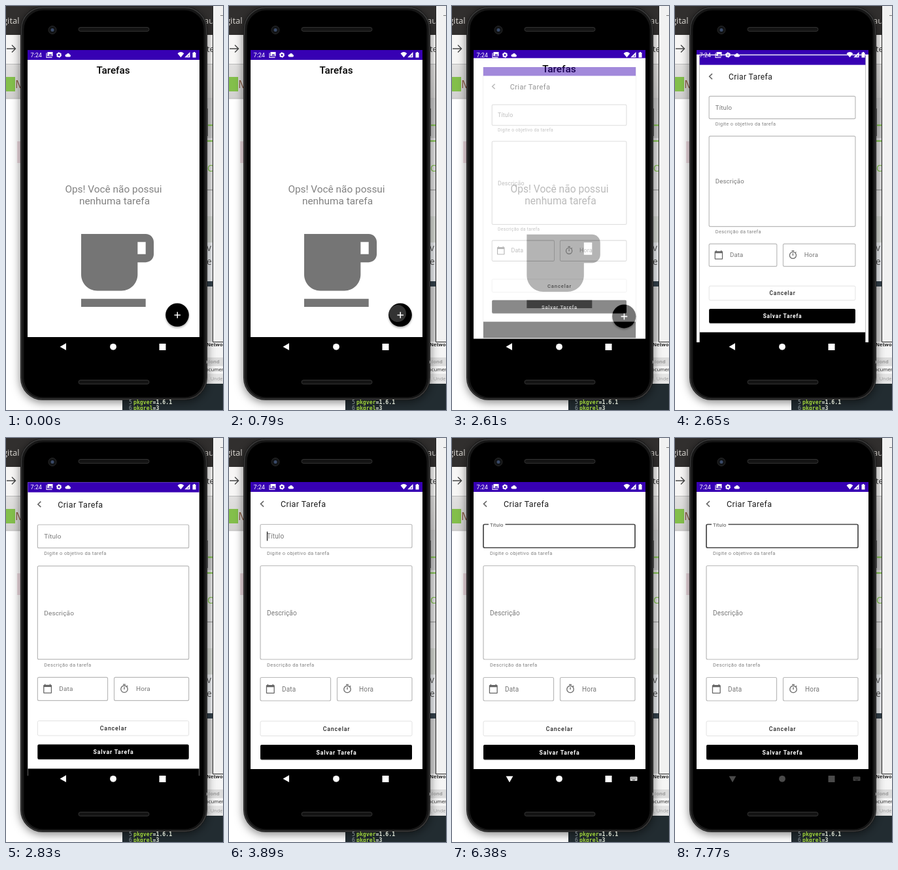
These frames come from a looping animation (332x615 px, 8000 ms). An HTML page:

```html
<!DOCTYPE html>
<html lang="pt">
<head>
<meta charset="utf-8">
<style>
  html, body { margin: 0; width: 100%; height: 100%; overflow: hidden; background: #fff; }
  svg { display: block; width: 332px; height: 615px; }
  text { font-family: Roboto, sans-serif; }
  .desk text { font-family: "Open Sans", sans-serif; }
  .desk .mono { font: bold 8.2px "DejaVu Sans Mono", monospace; }
  .desk .line { font-weight: 400; fill: #8a9499; }
  .input { font-size: 10px; letter-spacing: .15px; fill: #777; }
  .hint { font-size: 7.6px; letter-spacing: .35px; fill: #808080; }
  .button { font-size: 8.75px; font-weight: 500; letter-spacing: .88px; text-anchor: middle; }
  .box { fill: none; stroke: #b9b9b9; stroke-width: 1.2; }
</style>
</head>
<body>
<svg viewBox="0 0 332 615">
  <defs>
    <clipPath id="screenClip"><rect x="33" y="67" width="263" height="465"/></clipPath>
    <clipPath id="fabClip"><circle cx="262" cy="470.3" r="17.8"/></clipPath>
    <filter id="phoneShadow" x="-20%" y="-10%" width="140%" height="120%">
      <feDropShadow dx="0" dy="3" stdDeviation="7" flood-opacity=".5"/>
    </filter>
    <filter id="fabShadow" x="-30%" y="-30%" width="160%" height="180%">
      <feDropShadow dx="0" dy="1.8" stdDeviation="1.8" flood-opacity=".35"/>
    </filter>
    <filter id="buttonShadow" x="-5%" y="-30%" width="110%" height="180%">
      <feDropShadow dx="0" dy=".7" stdDeviation=".7" flood-opacity=".35"/>
    </filter>
    <linearGradient id="tabs" x2="0" y2="1">
      <stop stop-color="#e2e1e0"/><stop offset="1" stop-color="#d2d1d0"/>
    </linearGradient>
  </defs>

  <!-- desktop behind the phone -->
  <g class="desk">
    <rect width="332" height="615" fill="#fff"/>
    <rect width="332" height="44" fill="#312f2e"/>
    <text x="-5" y="27" font-size="13" fill="#dedbd6">gital</text>
    <text x="303" y="27" font-size="13" fill="#dedbd6">au</text>
    <rect y="44" width="332" height="44" fill="#f7f6f5"/>
    <path d="M1 65H14M9 59.5L14.5 65L9 70.5" fill="none" stroke="#444" stroke-width="1.4"/>
    <text x="307" y="70" font-size="13" fill="#333">te</text>
    <rect y="88" width="332" height="53" fill="url(#tabs)"/>
    <path d="M0 88.5H332M0 141H332" stroke="#bbb"/>
    <rect x="-8" y="108" width="22" height="22" fill="#83bf4b"/>
    <text x="14" y="125" font-size="17" fill="#86583f">M</text>
    <rect x="17" y="206" width="6" height="33" fill="#efdce2"/>
    <rect x="300" y="141" width="32" height="60" fill="#c9c9c9"/>
    <rect x="300" y="201" width="32" height="159" fill="#e4e4e4"/>
    <path d="M306 181.5H316M306 205.5H316" stroke="#7bc143" stroke-width="2"/>
    <text x="308" y="252" font-size="14" fill="#7bc143">C</text>
    <path d="M308 280H316" stroke="#888"/>
    <rect x="300" y="320" width="32" height="40" fill="#d4d8d2"/>
    <rect x="300" y="360" width="32" height="60" fill="#eceef1"/>
    <text x="307" y="373" font-size="14" fill="#555">v</text>
    <text x="307" y="394" font-size="14" fill="#555">e</text>
    <rect x="300" y="419" width="32" height="8" fill="#33404a"/>
    <rect x="300" y="427" width="32" height="84" fill="#d5d5d5"/>
    <rect x="300" y="511" width="32" height="24" fill="#f5f5f5"/>
    <rect x="300" y="535" width="32" height="13" fill="#dcdcdc"/>
    <rect x="300" y="548" width="32" height="12" fill="#f5f5f5"/>
    <rect x="300" y="560" width="32" height="15" fill="#e4e4e4"/>
    <rect x="178" y="575" width="154" height="40" fill="#222c31"/>
  </g>

  <!-- phone body -->
  <rect x="22" y="1" width="286" height="599" rx="34" fill="#161616" filter="url(#phoneShadow)"/>
  <rect x="23.5" y="2.5" width="283" height="596" rx="32.5" fill="none" stroke="#3c3c3c" stroke-width="1.4"/>
  <rect x="27.5" y="6.5" width="275" height="589" rx="29"/>
  <g fill="#141414" stroke="#333">
    <rect x="111" y="32.5" width="108" height="6" rx="3"/>
    <rect x="111" y="569.5" width="108" height="6" rx="3"/>
  </g>
  <circle cx="71" cy="36.5" r="6" fill="#111315" stroke="#292929"/>
  <circle cx="71" cy="36.5" r="2.5" fill="#3a4a68"/>
  <path d="M308.5 156V198" stroke="#555"/>

  <g class="desk">
    <g font-weight="700" font-size="7.4">
      <text x="307" y="518" fill="#222">Networ</text>
      <text x="306" y="544" fill="#999">xiond</text>
    </g>
    <text x="305" y="556" font-size="7.8" fill="#222">ocumer</text>
    <text x="309" y="570" font-size="7.4" fill="#999">, Unde</text>
    <text class="mono line" x="188" y="606">5</text>
    <text class="mono" x="195" y="606" fill="#9fd23c">pkgver<tspan fill="#dfe6d8">=1.6.1</tspan></text>
    <text class="mono line" x="188" y="615">6</text>
    <text class="mono" x="195" y="615" fill="#9fd23c">pkgrel<tspan fill="#dfe6d8">=3</tspan></text>
    <path d="M316.5 -1V511.5H333V-1Z" fill="#f1f1f1" stroke="#222"/>
    <path d="M328 14.5H332" stroke="#777"/>
  </g>

  <g clip-path="url(#screenClip)">
    <rect x="33" y="67" width="263" height="465"/>
    <g id="home">
      <rect x="33" y="67" width="263" height="465"/>
      <rect x="33" y="67" width="263" height="437" fill="#fff"/>
      <rect x="33" y="67" width="263" height="15" fill="#3700b3"/>
      <text x="164" y="103" font-size="15.2" font-weight="500" text-anchor="middle">Tarefas</text>
      <g font-size="15.4" fill="#828282" text-anchor="middle">
        <text x="164.5" y="284">Ops! Você não possui</text>
        <text x="166" y="302">nenhuma tarefa</text>
      </g>
      <path transform="translate(90.3 328.5) scale(6.17)" fill="#757575" d="M20 3H4v10c0 2.21 1.79 4 4 4h6c2.21 0 4-1.79 4-4v-3h2c1.11 0 2-.89 2-2V5c0-1.11-.89-2-2-2zm0 5h-2V5h2v3zM4 19h16v2H4z"/>
      <circle cx="262" cy="470.3" r="17.8" filter="url(#fabShadow)"/>
      <g clip-path="url(#fabClip)"><circle id="ripple" cx="258" cy="468" fill="#fff"/></g>
      <path d="M257.5 470.5H267M262.25 465.75V475.25" stroke="#fff" stroke-width="1.5"/>
    </g>

    <g id="form">
      <rect x="33" y="67" width="263" height="465"/>
      <rect x="33" y="67" width="263" height="437" fill="#fff"/>
      <rect x="33" y="67" width="263" height="15" fill="#3700b3"/>
      <path d="M53 96L48.5 100.3L53 104.6" fill="none" stroke="#666" stroke-width="1.6"/>
      <text x="79" y="105" font-size="12.5" letter-spacing=".4" fill="#1c1c1c">Criar Tarefa</text>

      <rect id="titleBox" class="box" x="48" y="131.5" width="232" height="35.5" rx="2"/>
      <rect id="notch" x="56" y="129" height="5" fill="#fff"/>
      <text id="titleLabel" class="input">Título</text>
      <path id="caret" d="M58.5 142.5V156.5" stroke="#111" stroke-width="1.2"/>
      <text class="hint" x="58" y="178">Digite o objetivo da tarefa</text>

      <rect class="box" x="48" y="194.5" width="232" height="142.5" rx="2"/>
      <text class="input" x="58" y="269.5">Descrição</text>
      <text class="hint" x="58" y="348">Descrição da tarefa</text>

      <rect class="box" x="48" y="364.5" width="107.5" height="35.5" rx="2"/>
      <rect class="box" x="165.5" y="364.5" width="114.5" height="35.5" rx="2"/>
      <path transform="translate(55.5 374) scale(.65)" fill="#666" d="M20 3h-1V1h-2v2H7V1H5v2H4c-1.1 0-2 .9-2 2v16c0 1.1.9 2 2 2h16c1.1 0 2-.9 2-2V5c0-1.1-.9-2-2-2zm0 18H4V8h16v13z"/>
      <g transform="translate(173.2 374) scale(.65)" fill="none" stroke="#666" stroke-width="2">
        <circle cx="12" cy="13" r="8"/>
        <path d="M9 2H15M12 8V14M18 7L20 5"/>
      </g>
      <text class="input" x="81" y="385.5">Data</text>
      <text class="input" x="199" y="385.5">Hora</text>

      <rect x="48" y="431" width="232" height="22.5" rx="2" fill="#fff" stroke="#e2e2e2"/>
      <text class="button" x="164.5" y="445.5" fill="#222">Cancelar</text>
      <rect x="48" y="467" width="232" height="22.5" rx="2" filter="url(#buttonShadow)"/>
      <text class="button" x="164.5" y="481.5" fill="#fff" style="font-weight:700;letter-spacing:.8px">Salvar Tarefa</text>
    </g>

    <!-- status bar -->
    <g fill="#fff">
      <text x="37.5" y="77.5" font-size="9">7:24</text>
      <path d="M63.5 70h8v6.5h-8zM61.5 71.5h1v6.5h8v1h-9z"/>
      <path d="M65 75.5l2-2.5 1 1.2 1-1 1.5 2.3z" fill="#3700b3"/>
      <circle cx="81" cy="74.5" r="2.5" fill="none" stroke="#fff" stroke-width="2"/>
      <circle cx="81" cy="74.5" r="3.7" fill="none" stroke="#fff" stroke-dasharray="1.94"/>
      <path d="M92.5 77.5a2 2 0 0 1 0-4a2.7 2.7 0 0 1 5 .3a1.9 1.9 0 0 1 0 3.7z"/>
      <path d="M262.5 72.2q4.9-4.2 9.8 0l-4.9 6z"/>
      <path d="M281.5 70v8.3h-8.3z"/>
      <path d="M279.7 74.5v2.2h-2.2z" fill="#3700b3"/>
      <path d="M285.5 71h1.5v-1h2v1h1.5v7.5h-5z"/>
    </g>

    <!-- navigation bar -->
    <g id="nav" fill="#fff">
      <path id="back" d="M82.5 518.7L92 513.3V524.1Z"/>
      <circle cx="164" cy="518.8" r="4.9"/>
      <rect x="234.5" y="514" width="10" height="10" rx=".5"/>
      <g id="keyboard">
        <rect x="272.5" y="515.5" width="11" height="6.5" rx="1"/>
        <path d="M274 517.3H282M274 519H282" stroke="#000" stroke-width=".7" stroke-dasharray=".7 1"/>
        <path d="M276 520.7H280" stroke="#000" stroke-width=".7"/>
      </g>
    </g>
  </g>
</svg>
<script>
const LOOP = 8000;
const el = id => document.getElementById(id);
const set = (id, attrs) => Object.entries(attrs).forEach(([k, v]) => el(id).setAttribute(k, v));
const ramp = (t, from, to) => Math.min(1, Math.max(0, (t - from) / (to - from)));
const mix = (a, b, p) => a + (b - a) * p;
const easeOut = p => 1 - (1 - p) ** 3;
const easeInOut = p => p * p * (3 - 2 * p);
const bezier = (p, u) => p[0] * (1 - u) ** 3 + 3 * p[1] * u * (1 - u) ** 2 + 3 * p[2] * u * u * (1 - u) + p[3] * u ** 3;

// Two joined curves: a quick start followed by a very slow settling.
function emphasized(x) {
  const [xs, ys] = x < 1 / 6
    ? [[0, .05, .1333, 1 / 6], [0, 0, .06, .4]]
    : [[1 / 6, .2083, .25, 1], [.4, .82, 1, 1]];
  let low = 0, high = 1;
  for (let i = 0; i < 24; i++) {
    const mid = (low + high) / 2;
    if (bezier(xs, mid) < x) low = mid; else high = mid;
  }
  return bezier(ys, low);
}

const scaleAboutCentre = s => `translate(164.5 297) scale(${s}) translate(-164.5 -297)`;
const caretSpans = [[3890, 4410], [4910, 5730], [5910, 6380], [6880, 7380]];

function render(t) {
  const release = ramp(t, 1220, 1390);
  set('ripple', {
    r: mix(mix(2, 13, easeOut(ramp(t, 480, 790))), 24, release),
    opacity: t < 500 ? 0 : .2 * (1 - release)
  });

  const step = t - (t - 10) % 40;
  const opening = emphasized(ramp(step, 2552, 2952));
  set('home', { transform: scaleAboutCentre(mix(1, 1.05, opening)), display: t < 2952 ? 'inline' : 'none' });
  set('form', { transform: scaleAboutCentre(mix(.85, 1, opening)), opacity: ramp(step, 2587, 2637) });

  const focus = easeInOut(ramp(t, 3920, 4200));
  const grey = Math.round(mix(185, 70, focus));
  set('titleLabel', {
    transform: `translate(58 ${mix(153, 134.6, focus)}) scale(${mix(1, .78, focus)})`,
    style: `fill:rgb(${Array(3).fill(Math.round(mix(119, 80, focus)))})`
  });
  set('titleBox', { style: `stroke:rgb(${grey},${grey},${grey});stroke-width:${mix(1.2, 1.7, focus)}` });
  set('notch', { width: 25.5 * focus });
  set('caret', { opacity: caretSpans.some(([on, off]) => t >= on && t < off) ? 1 : 0 });

  const dim = t < 7730 ? 1 : t < 7770 ? .6 : .29;
  set('nav', { opacity: dim });
  set('keyboard', { opacity: t < 5730 ? 0 : t < 5770 ? .5 : .85 });
  set('back', { transform: `rotate(${-90 * easeInOut(ramp(t, 5880, 6100))} 88 518.7)` });
}

function tick() {
  render(performance.now() % LOOP);
  requestAnimationFrame(tick);
}
tick();
</script>
</body>
</html>
```
